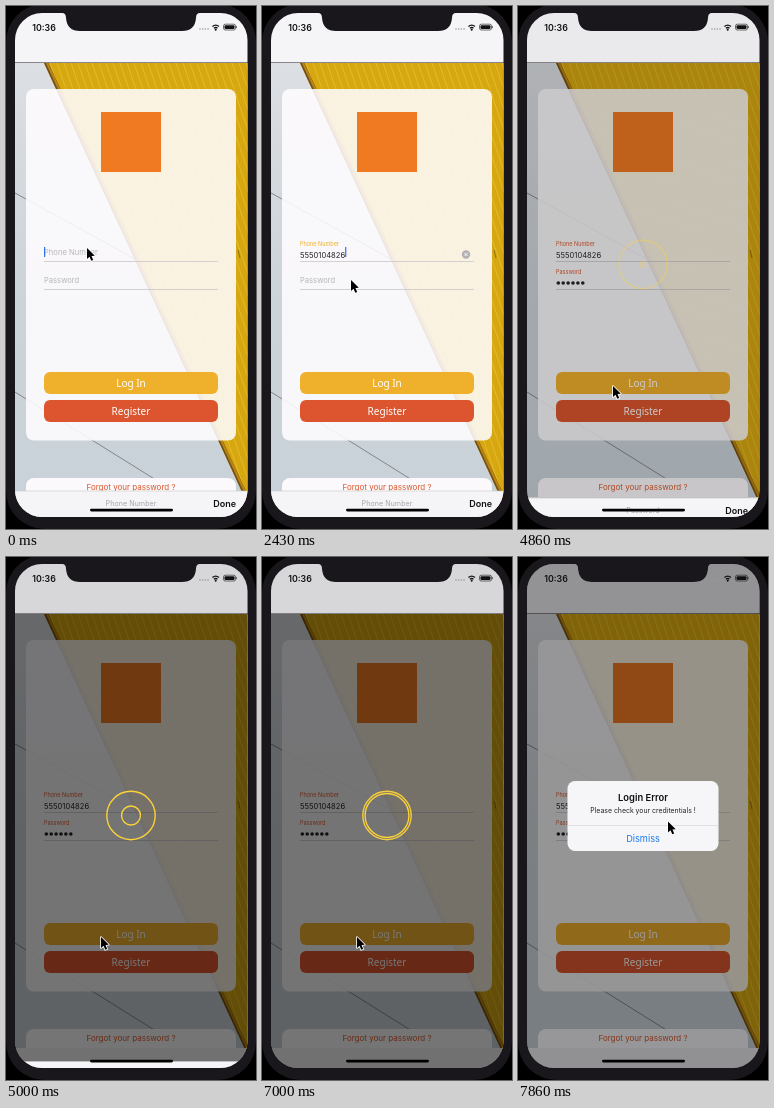
These frames come from a looping animation (250 px wide and 523 px high, 8 s). An HTML page with a canvas:

```html
<!DOCTYPE html>
<html lang="en">
<head>
<meta charset="utf-8">
<title>Login screen</title>
<style>
  html, body { margin: 0; width: 100%; height: 100%; overflow: hidden; background: #000; }
  canvas { display: block; width: 250px; height: 523px; }
</style>
</head>
<body>
<canvas id="stage"></canvas>
<script>
const canvas = document.getElementById('stage');
const ctx = canvas.getContext('2d');
const ratio = window.devicePixelRatio || 1;
canvas.width = 250 * ratio;
canvas.height = 523 * ratio;

const LOOP = 8000, TICK = 1000 / 7;
const UI = 'Inter, sans-serif', BUTTON = '"Noto Sans", sans-serif';
const RED = '#d9592b', AMBER = '#efb02c', GREY = '#b9b6b9', INK = '#242226', BLUE = '#2f72ee';
const PHONE = '5550104826', PASSWORD = 'access';
const PASSWORD_FOCUS = 2560, SUBMIT = 4710, LOADER = 4857, ALERT = 7120;

const clamp = x => Math.max(0, Math.min(1, x));
const ramp = (t, from, to) => clamp((t - from) / (to - from));
const smooth = x => x * x * (3 - 2 * x);
const mix = (a, b, p) => a + (b - a) * p;

function rect(x, y, w, h, fill, radius = 0) {
  ctx.beginPath();
  ctx.roundRect(x, y, w, h, radius);
  ctx.fillStyle = fill;
  ctx.fill();
}

function poly(points, fill) {
  ctx.beginPath();
  points.forEach(([x, y]) => ctx.lineTo(x, y));
  ctx.closePath();
  ctx.fillStyle = fill;
  ctx.fill();
}

function line(x1, y1, x2, y2, color, width = 1) {
  ctx.beginPath();
  ctx.moveTo(x1, y1);
  ctx.lineTo(x2, y2);
  ctx.strokeStyle = color;
  ctx.lineWidth = width;
  ctx.stroke();
}

function disc(x, y, r, fill) {
  ctx.beginPath();
  ctx.arc(x, y, r, 0, 7);
  ctx.fillStyle = fill;
  ctx.fill();
}

function text(str, x, y, size, color, align = 'left', weight = 400, family = UI) {
  ctx.font = `${weight} ${size}px ${family}`;
  ctx.textAlign = align;
  ctx.textBaseline = 'alphabetic';
  ctx.fillStyle = color;
  ctx.fillText(str, x, y);
  return ctx.measureText(str).width;
}

function faded(alpha, draw) {
  if (alpha <= 0) return;
  ctx.save();
  ctx.globalAlpha = alpha;
  draw();
  ctx.restore();
}

function screenPath() {
  ctx.beginPath();
  ctx.moveTo(36, 7);
  ctx.lineTo(56, 7);
  ctx.quadraticCurveTo(60, 7, 60, 12);
  ctx.quadraticCurveTo(61, 25, 74, 25);
  ctx.lineTo(176, 25);
  ctx.quadraticCurveTo(189, 25, 190, 12);
  ctx.quadraticCurveTo(190, 7, 194, 7);
  ctx.lineTo(214, 7);
  ctx.arcTo(241.5, 7, 241.5, 34, 27);
  ctx.arcTo(241.5, 511, 214, 511, 27);
  ctx.arcTo(9, 511, 9, 484, 27);
  ctx.arcTo(9, 7, 36, 7, 27);
  ctx.closePath();
}

function backdrop() {
  const wall = ctx.createLinearGradient(0, 57, 0, 491);
  wall.addColorStop(0, '#dcdfe3');
  wall.addColorStop(.5, '#cdd4da');
  wall.addColorStop(1, '#c9d2d8');
  rect(9, 57, 233, 434, wall);
  line(9, 187, 200, 292, '#6e7377', .8);
  line(9, 386, 150, 474, '#6e7377', .8);
  ctx.save();
  ctx.beginPath();
  [[38, 57], [242, 57], [242, 499]].forEach(([x, y]) => ctx.lineTo(x, y));
  ctx.clip();
  rect(30, 57, 212, 440, '#d6a70f');
  for (let x = -110; x < 250; x += 7) line(x, 57, x + 150, 497, 'rgba(246,214,92,.5)', .8);
  line(38, 57, 242, 499, '#73501a', 8);
  line(41, 57, 245, 499, '#b9840f', 2);
  ctx.restore();
  line(232, 244, 234, 252, '#7b6116', .8);
  rect(9, 491, 233, 20, '#f1f0f2');
}

function field(label, y, { filled, focused, lift }) {
  const color = focused ? AMBER : RED;
  if (filled) faded(lift, () => text(label, 38, mix(y - 7, y - 11, lift), 5.5, color));
  else text(label, 38, y - 2, 7.6, GREY);
  line(38, y + 4.5, 212, y + 4.5, '#cbc7ca', .8);
  if (focused && filled) {
    disc(204, y - 2.5, 4.2, '#b3b0b2');
    line(202.4, y - 4.1, 205.6, y - .9, '#fff', .9);
    line(205.6, y - 4.1, 202.4, y - .9, '#fff', .9);
  }
}

function caret(x, y) {
  rect(x, y - 8, 1.2, 10, BLUE);
}

function form(t) {
  rect(20, 83, 210, 351.5, 'rgba(255,253,255,.87)', 8);
  rect(20, 472, 210, 19, 'rgba(255,253,255,.92)', [8, 8, 0, 0]);
  rect(95, 106, 60, 60, '#f07a22');

  // A short pause falls between the sixth and seventh digit
  const digits = t < 565 ? 0 : Math.min(10, Math.floor((t - 565) / TICK) + (t < 1420 ? 1 : 0));
  const letters = t < 2995 ? 0 : Math.min(6, Math.floor((t - 2995) / TICK) + 1);
  const onPhone = t < PASSWORD_FOCUS, onPassword = !onPhone && t < SUBMIT;

  field('Phone Number', 251, { filled: digits > 0, focused: onPhone, lift: ramp(t, 480, 780) });
  const phoneWidth = text(PHONE.slice(0, digits), 38, 251.5, 7.6, INK);
  if (onPhone) caret(38 + phoneWidth, 249);

  field('Password', 279, { filled: letters > 0, focused: onPassword, lift: ramp(t, 2900, 3200) });
  const shown = letters > 0 && t < 4100;
  const dots = shown ? letters - 1 : letters;
  for (let i = 0; i < dots; i++) disc(40.3 + i * 4.9, 277, 1.8, INK);
  let end = 38 + dots * 4.9;
  if (shown) end += text(PASSWORD[letters - 1], end, 279.5, 7.6, INK);
  if (onPassword) caret(end, 279);

  rect(38, 366, 174, 22, AMBER, 6);
  rect(38, 394, 174, 22, '#dc552e', 6);
  text('Log In', 125, 380.5, 10, '#fff', 'center', 400, BUTTON);
  text('Register', 125, 408.5, 10, '#fff', 'center', 400, BUTTON);
  text('Forgot your password ?', 125, 483.5, 8, RED, 'center');
}

function statusBar() {
  text('10:36', 38, 24.5, 8.8, '#111', 'center', 600);
  for (let i = 0; i < 4; i++) disc(194 + i * 2.7, 23, .8, '#98979a');
  ctx.strokeStyle = '#111';
  ctx.lineWidth = 1.3;
  [2.6, 4.9].forEach(r => {
    ctx.beginPath();
    ctx.arc(209.7, 24.2, r, -2.3, -.84);
    ctx.stroke();
  });
  disc(209.7, 23.7, 1, '#111');
  ctx.beginPath();
  ctx.roundRect(217.5, 18.2, 12, 5.8, 1.7);
  ctx.lineWidth = .6;
  ctx.stroke();
  rect(218.5, 19.2, 10, 3.8, '#111', 1);
  rect(230.2, 20, .8, 2.2, '#555');
}

function toolbar(t) {
  const y = mix(485, 511, smooth(ramp(t, SUBMIT, 5140)));
  if (y >= 511) return;
  rect(9, y, 233, 30, '#f5f4f7');
  line(9, y, 242, y, '#c9c7cb', .6);
  text(t < PASSWORD_FOCUS ? 'Phone Number' : 'Password', 125, y + 15, 7.2, '#a9a6aa', 'center');
  text('Done', 230, y + 16, 9, '#111', 'right', 600);
}

function bezier(a, b, s) {
  return 3 * (1 - s) ** 2 * s * a + 3 * (1 - s) * s * s * b + s ** 3;
}

function rippleEase(x) {
  let low = 0, high = 1;
  for (let i = 0; i < 20; i++) {
    const mid = (low + high) / 2;
    if (bezier(.21, .56, mid) < x) low = mid;
    else high = mid;
  }
  return bezier(.53, .8, low);
}

function loader(t) {
  [0, 200].forEach(delay => {
    const age = t - LOADER - delay;
    const phase = age < 0 ? 875 : age % 1250;
    faded(ctx.globalAlpha * (1 - ramp(phase, 875, 1250)), () => {
      ctx.beginPath();
      ctx.arc(125, 258.5, 24.2 * mix(.1, 1, rippleEase(clamp(phase / 875))), 0, 7);
      ctx.strokeStyle = '#fbd237';
      ctx.lineWidth = 1.4;
      ctx.stroke();
    });
  });
}

function alertBox(p) {
  const scale = 1 + .2 * (1 - p) ** 3;
  ctx.translate(125, 259);
  ctx.scale(scale, scale);
  rect(-75.5, -35, 151, 70, '#f6f5f7', 7.5);
  text('Login Error', 0, -15, 9.4, '#111', 'center', 600);
  text('Please check your creditentials !', 0, -3.5, 6.9, '#222', 'center');
  line(-75.5, 9.5, 75.5, 9.5, '#d2d0d4', .6);
  text('Dismiss', 0, 26, 9.2, '#1a7af0', 'center');
}

function pointer(t) {
  const stops = [[0, 81, 242], [2000, 81, 242], [2430, 89, 274], [4100, 89, 274],
    [4570, 95, 380], [7430, 95, 380], [7857, 150, 264.5], [8000, 150, 264.5]];
  const i = stops.findIndex(s => s[0] > t);
  const [t0, x0, y0] = stops[i - 1], [t1, x1, y1] = stops[i];
  const p = smooth(ramp(t, t0, t1));
  ctx.save();
  ctx.translate(mix(x0, x1, p), mix(y0, y1, p));
  ctx.beginPath();
  [[0, 0], [0, 11], [2.5, 8.8], [4.3, 12.8], [6.2, 12], [4.5, 8], [7.8, 7.8]]
    .forEach(([x, y]) => ctx.lineTo(x, y));
  ctx.closePath();
  ctx.lineJoin = 'round';
  ctx.strokeStyle = '#fff';
  ctx.lineWidth = 1.6;
  ctx.stroke();
  ctx.fillStyle = '#000';
  ctx.fill();
  ctx.restore();
}

function draw(t) {
  const busy = ramp(t, 4780, 4980) * (1 - ramp(t, 7060, 7200));
  const alertIn = ramp(t, ALERT, ALERT + 400);
  ctx.setTransform(ratio, 0, 0, ratio, 0, 0);
  rect(0, 0, 250, 523, '#000');
  rect(0, -2, 250, 525, '#19171b', 38);

  ctx.save();
  screenPath();
  ctx.clip();
  backdrop();
  form(t);
  rect(9, 57, 233, 454, `rgba(0,0,0,${.53 * busy})`);
  rect(9, 7, 233, 49.5, '#f5f4f7');
  toolbar(t);
  rect(9, 7, 233, 49.5, `rgba(0,0,0,${.12 * busy})`);
  faded(busy, () => loader(t));
  rect(9, 7, 233, 504, `rgba(0,0,0,${.4 * clamp(alertIn * 2.4)})`);
  statusBar();
  rect(84, 502.7, 83, 2.8, '#000', 1.4);
  faded(clamp(alertIn * 2.4), () => alertBox(alertIn));
  ctx.restore();

  pointer(t);
}

const start = performance.now();
function frame() {
  const t = (performance.now() - start) % LOOP;
  draw(Math.floor((t + 5) / TICK) * TICK % LOOP);
  requestAnimationFrame(frame);
}
frame();
</script>
</body>
</html>
```
